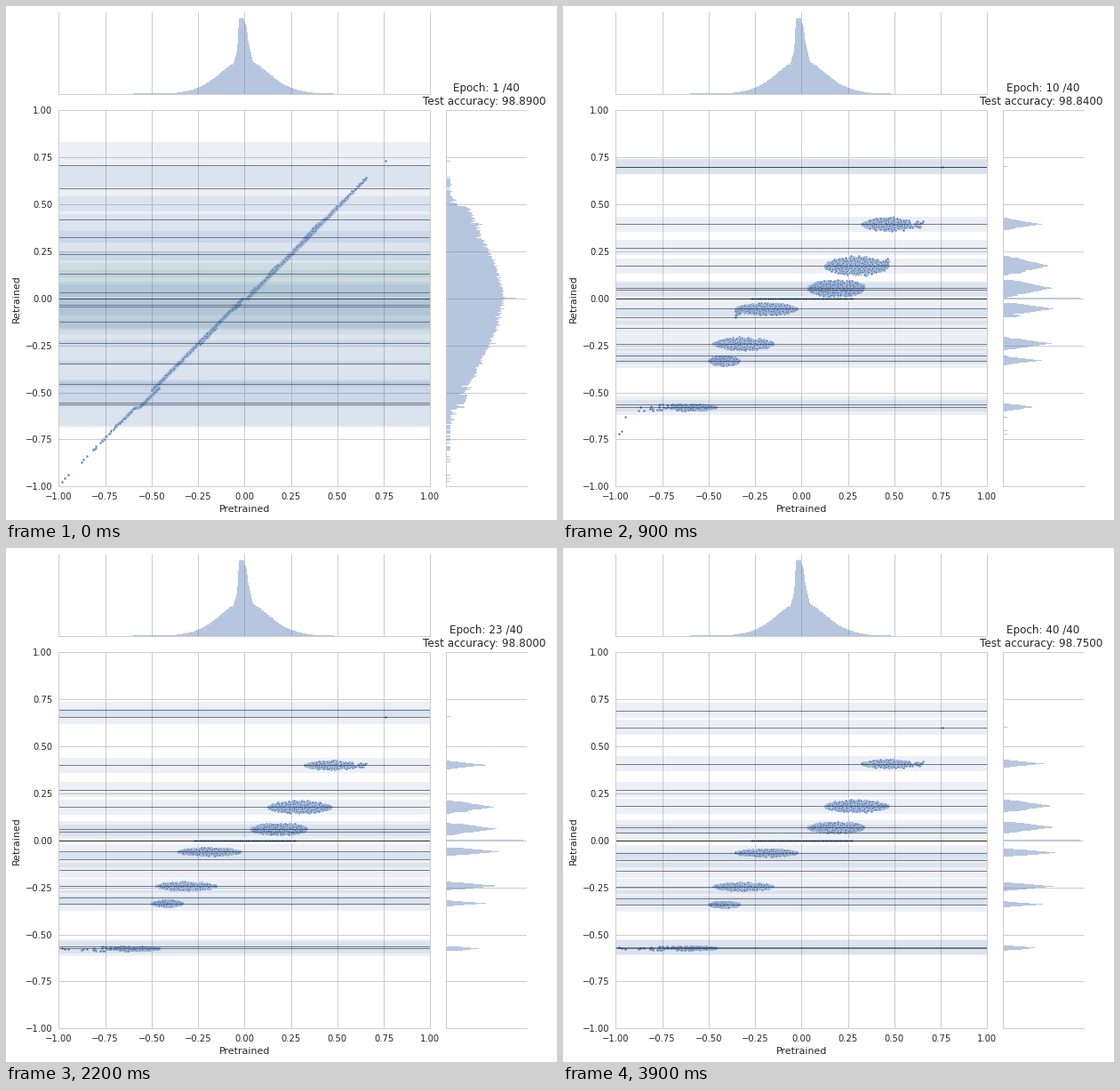
A matplotlib script that plays this animation: 620 by 578 pixels, repeating every 4000 ms.

```python
import numpy as np
import matplotlib.pyplot as plt
from matplotlib.animation import FuncAnimation

W, H, DPI = 620, 578, 100
PX = 72 / DPI  # points per pixel
EPOCHS = 40
BLUE, GREEN, GRID, INK = "#4C72B0", "#55A868", "#cccccc", "#262626"
LEFT, RIGHT, TOP, BOTTOM = 59.4, 477.4, 117.3, 540.3
MID_X, MID_Y = (LEFT + RIGHT) / 2, (TOP + BOTTOM) / 2
SIDE_W = 90.6
TOTAL = 642000  # number of weights the histograms stand for
TICKS = np.linspace(-1, 1, 9)

rng = np.random.default_rng(4)

# Mixture component means at a few epochs
MEAN_EPOCHS = [1, 4, 10, 40]
MEANS = np.array([
    [.71, .715, .70, .69], [.585, .715, .70, .60], [.42, .41, .395, .408],
    [.325, .36, .27, .27], [.235, .235, .173, .183], [.13, .13, .055, .07],
    [.03, .025, .045, .043], [0, 0, 0, 0], [-.035, -.03, -.055, -.065],
    [-.045, -.04, -.10, -.104], [-.125, -.125, -.158, -.16],
    [-.235, -.24, -.24, -.245], [-.345, -.43, -.305, -.306],
    [-.455, -.43, -.33, -.34], [-.555, -.557, -.562, -.566],
    [-.565, -.562, -.578, -.572],
])
ZERO = 7

# Clusters: component, x range, half height
CLUSTERS = [
    (ZERO, -.27, .27, 0),
    (15, -1, -.46, .014),
    (13, -.5, -.335, .017),
    (11, -.475, -.155, .022),
    (8, -.357, -.025, .021),
    (5, .035, .335, .032),
    (4, .125, .465, .034),
    (2, .325, .69, .025),
    (1, .7, 1, 0),
]


def means_at(epoch):
    return np.array([np.interp(epoch, MEAN_EPOCHS, m) for m in MEANS])


def normal(x, s):
    return np.exp(-x**2 / (2 * s * s)) / (s * np.sqrt(2 * np.pi))


def make_points(n=9500, lo=-.55, hi=.5):
    """Pretrained values and how many weights each one stands for."""
    x = lo + (hi - lo) * (np.arange(n) + rng.random(n)) / n
    pdf = .77 * normal(x, .12) + .18 * normal(x, .2) + .05 * normal(x, .02)
    left = lo - rng.exponential(.075, 190)
    right = hi + rng.exponential(.045, 120)
    left, right = left[left > -.89], right[right < .68]
    tail = np.r_[left, right, -.985, -.967, -.95, .757]
    weight = np.r_[TOTAL * (hi - lo) / n * pdf, np.ones(len(tail))]
    order = rng.permutation(len(weight))
    return np.r_[x, tail][order], weight[order]


def assign_clusters(x, weight):
    label = np.zeros(len(x), int)
    for i, v in enumerate(x):
        options = [k for k, c in enumerate(CLUSTERS) if k and c[1] <= v <= c[2]]
        if not options:
            continue
        share = max(0, .94 * (1 - (v / .27)**4))
        if abs(v) < .27 and rng.random() < .35:
            weight[i] *= share / .35
        else:
            label[i] = rng.choice(options)
            weight[i] *= (1 - share) / (.65 if abs(v) < .27 else 1)
    return label


x0, weight = make_points()
label = assign_clusters(x0, weight)
comp, lo, hi, half = np.array(CLUSTERS).T[:, label]
comp = comp.astype(int)
u = rng.triangular(-1, 0, 1, len(x0))
noise = u * half * np.sqrt(np.sin(np.pi * np.clip((x0 - lo) / (hi - lo), 0, 1)))
weight = np.where((half > 0) & (weight > 1),
                  weight * 3.5 * np.exp(-7 * abs(u)) / (1.02 - abs(u)), weight)
is_zero, is_fast = label == 0, (label == 1) | (label == 2)
jitter = 1 + rng.uniform(-1, 1, len(x0)) * np.where(is_zero, .3, .15)


def retrained(epoch):
    """Soft-threshold each value towards the centre of its cluster."""
    centre = means_at(max(epoch, 10))[comp]
    keys = [1, 4, 10, 18]
    slow = np.interp(epoch, keys, [.012, .07, .3, .5])
    fast = np.interp(epoch, keys, [.012, .125, .3, .5])
    zero = np.interp(epoch, keys, [.012, .07, .42, .5])
    pull = np.where(is_zero, zero, np.where(is_fast, fast, slow))
    outward = (abs(centre) > abs(x0)) & ~is_fast
    pull = np.maximum(0, pull - .1 * outward) * jitter
    gap = x0 - centre
    amp = np.interp(epoch, [1, 4, 10, 18, 40], [.3, .6, 1.6, 1.05, 1])
    y = centre + np.sign(gap) * np.maximum(abs(gap) - pull, 0) + noise * amp
    lone = np.interp(epoch, MEAN_EPOCHS, [.73, .715, .70, .60])
    return np.where(label == 8, lone, y)


def band_half(epoch):
    half = np.full(len(MEANS), np.interp(epoch, [1, 2, 3, 4], [.122, .08, .055, .04]))
    half[ZERO] = np.interp(epoch, [1, 4, 8], [.19, .13, .002])
    return half


# One histogram row per pixel
EDGES = (MID_Y - np.arange(541, 116, -1)) * 2 / (BOTTOM - TOP)
ZERO_ROW = np.searchsorted(EDGES, 0) - 1


def side_widths(y, epoch):
    """Bar lengths in pixels on a logarithmic scale."""
    count, _ = np.histogram(y, EDGES, weights=weight)
    scale = 82.7 / np.log10(count.max())
    bars = np.where(count > .3, 4.1 + scale * np.log10(np.maximum(count / 3, 1)), 0)
    bars[ZERO_ROW] = 79 if epoch < 10 else 87
    return bars


def top_heights(x):
    base = 30 * np.exp(-x**2 / .0288) + 9 * np.exp(-x**2 / .08)
    spike = np.interp(x, [-.06, -.04, -.03, -.005, .01, .02, .045],
                      [0, 12, 47, 47, 38, 22, 0])
    h = base + spike + rng.normal(0, .5, len(x)) * np.sqrt(base / 39)
    return np.where((x > -.6) & (x < .48), np.maximum(h, 1), 0)


plt.rcParams["font.family"] = "DejaVu Sans"
fig = plt.figure(figsize=(W / DPI, H / DPI), dpi=DPI, facecolor="white")


def add_axes(left, top, right, bottom, hidden=()):
    ax = fig.add_axes([left / W, 1 - bottom / H, (right - left) / W, (bottom - top) / H])
    ax.set_axisbelow(True)
    ax.grid(True, color=GRID, lw=PX, ls="-")
    ax.tick_params(length=0, pad=7 * PX, labelsize=10 * PX, labelcolor=INK)
    for side, spine in ax.spines.items():
        spine.set(color=GRID, linewidth=PX, visible=side not in hidden)
    return ax


def put_text(x, y, s, size, **kw):
    return fig.text(x / W, 1 - y / H, s, fontsize=size * PX, color=INK, ha="center", **kw)


joint = add_axes(LEFT, TOP, RIGHT, BOTTOM)
joint.set(xlim=(-1, 1), ylim=(-1, 1), xticks=TICKS, yticks=TICKS)

top_ax = add_axes(LEFT, 7.4, RIGHT, 99.4, hidden=["top"])
top_ax.set(xlim=(-1, 1), ylim=(0, 92), xticks=TICKS, yticks=[])
top_ax.tick_params(labelbottom=False)
columns = (np.arange(59, 479) - MID_X) * 2 / (RIGHT - LEFT)
top_ax.stairs(top_heights((columns[:-1] + columns[1:]) / 2), columns,
              fill=True, color=BLUE, alpha=.4, lw=0)

side_ax = add_axes(495.4, TOP, 495.4 + SIDE_W, BOTTOM, hidden=["right"])
side_ax.set(xlim=(0, SIDE_W), ylim=(-1, 1), xticks=[], yticks=TICKS)
side_ax.tick_params(labelleft=False)
side_hist = side_ax.stairs(np.zeros(len(EDGES) - 1), EDGES, orientation="horizontal",
                           fill=True, color=BLUE, alpha=.4, lw=0)
side_ax.set(xlim=(0, SIDE_W), ylim=(-1, 1))

dots = joint.scatter(x0, x0, s=8 * PX**2, color=BLUE, edgecolors="white",
                     linewidths=.4 * PX, zorder=1)
lines, bands = [], []
for k in range(len(MEANS)):
    lines.append(joint.axhline(0, color="black", lw=(.8 if k == ZERO else .5) * PX, zorder=1.1))
    bands.append(joint.axhspan(0, .1, color=GREEN if k == ZERO else BLUE,
                               alpha=.1, lw=0, zorder=1.2))
joint.set(xlim=(-1, 1), ylim=(-1, 1))

put_text(MID_X, 566, "Pretrained", 11, va="center")
put_text(12, MID_Y + .5, "Retrained", 11, va="center", rotation=90)
epoch_text = put_text(540.5, 96, "", 12, va="baseline")
accuracy_text = put_text(538.5, 111, "", 12, va="baseline")


def draw(i):
    epoch = i + 1
    y = retrained(epoch)
    dots.set_offsets(np.column_stack([x0, y]))
    side_hist.set_data(side_widths(y, epoch))
    for line, band, m, h in zip(lines, bands, means_at(epoch), band_half(epoch)):
        line.set_ydata([m, m])
        band.set_y(m - h)
        band.set_height(2 * h)
    accuracy = np.interp(epoch, [1, 4, 10, 18, 23, 31, 40],
                         [98.89, 98.98, 98.84, 98.79, 98.80, 98.78, 98.75])
    epoch_text.set_text(f"Epoch: {epoch} /{EPOCHS}")
    accuracy_text.set_text(f"Test accuracy: {round(accuracy, 2):.4f}")
    return []


anim = FuncAnimation(fig, draw, frames=EPOCHS, interval=100, repeat=True, repeat_delay=0)
plt.show()
```
